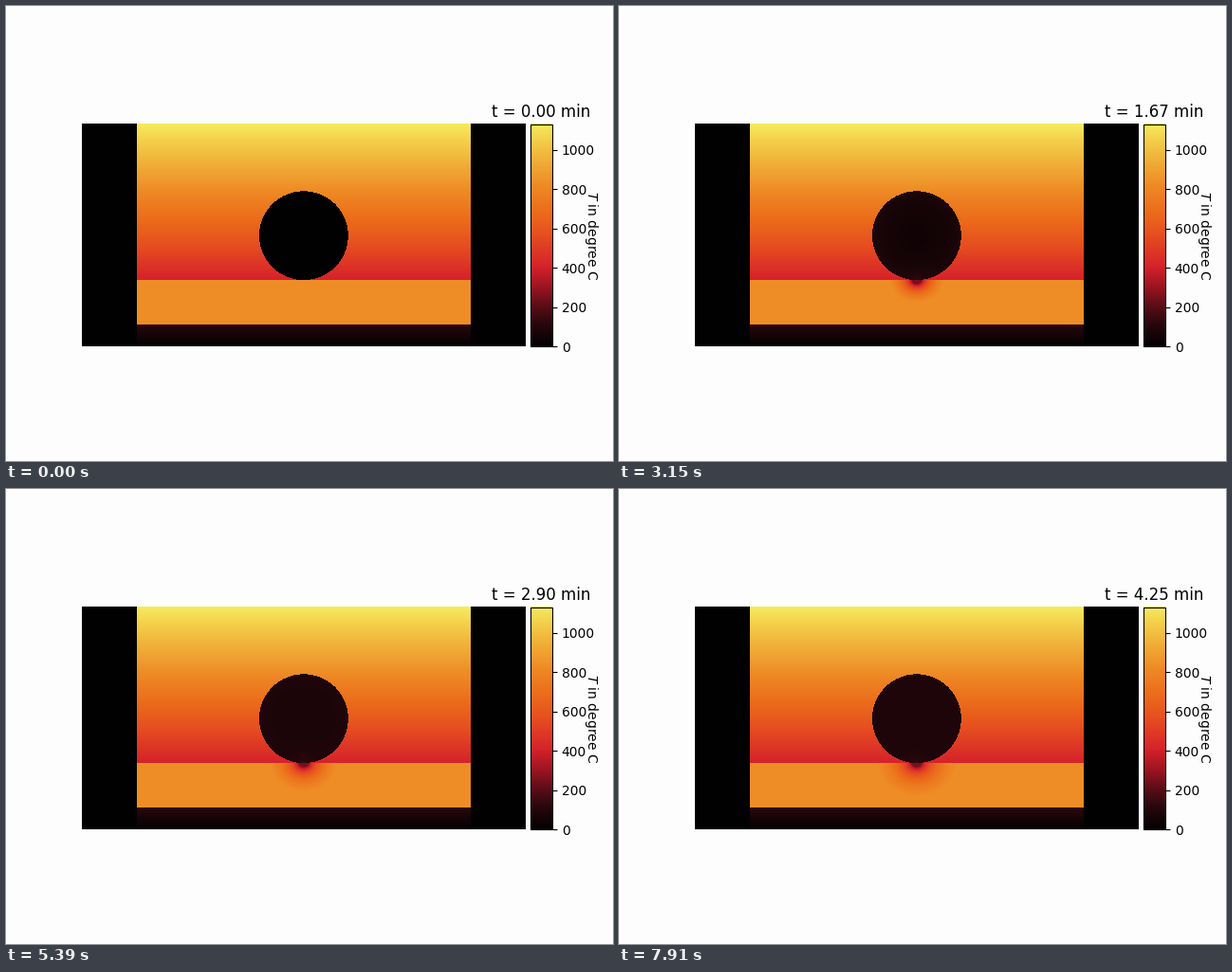
Animation, 640 px wide and 480 px high, one loop 8000 ms. Source, as a matplotlib script:

```python
import numpy as np
import matplotlib.pyplot as plt
from matplotlib.animation import FuncAnimation
from matplotlib.colors import LinearSegmentedColormap
from matplotlib.lines import Line2D
from matplotlib.markers import TICKRIGHT
from matplotlib.patches import Rectangle

W, H = 640, 480
DPI = 100
LOOP, TICK = 8000, 10
T_MAX = 1127.0
T_BED = 827.0

# Heat map pixels, y measured downwards
LEFT, TOP, COLS, ROWS = 80, 124, 468, 235
AIR_BOTTOM, BED_BOTTOM = 289, 336
WALL_L, WALL_R = 138, 490
CX, CY, RADIUS = 313.9, 242.2, 46.9

# Colour bar box: 5 % of the map's width, 5 px beside it, y upwards
MAP_W = (496 - 5) / 1.05
MID_Y = 237.6
BAR_X0, BAR_X1 = LEFT + MAP_W + 5, 576.0
BAR_Y0, BAR_Y1 = MID_Y - MAP_W / 4, MID_Y + MAP_W / 4

STOPS = [
    (0.00, (2, 1, 1)), (0.10, (40, 7, 12)), (0.18, (90, 13, 22)),
    (0.27, (158, 20, 34)), (0.36, (214, 34, 42)), (0.50, (230, 78, 32)),
    (0.60, (235, 106, 26)), (0.72, (238, 137, 36)), (0.85, (240, 179, 58)),
    (0.93, (243, 207, 74)), (1.00, (245, 234, 94)),
]
cmap = LinearSegmentedColormap.from_list(
    "heat", [(p, np.array(c) / 255) for p, c in STOPS], N=256)
LUT = (cmap(np.arange(256)) * 255).round().astype(np.uint8)


def colour(temp):
    idx = np.clip(temp / T_MAX * 256, 0, 255).astype(np.uint8)
    return LUT[idx]


X, Y = np.meshgrid(LEFT + np.arange(COLS) + 0.5, TOP + np.arange(ROWS) + 0.5)
inside = (X > WALL_L) & (X < WALL_R)
bed = inside & (Y > AIR_BOTTOM) & (Y < BED_BOTTOM)
rho2 = ((X - CX) ** 2 + (Y - CY) ** 2) / RADIUS ** 2
ball = (rho2 < 1) & (Y < AIR_BOTTOM)
contact = np.hypot(0.85 * (X - CX), Y - AIR_BOTTOM)


def base_field():
    temp = np.zeros((ROWS, COLS))
    depth = (Y - TOP) / (AIR_BOTTOM - TOP)
    air = inside & (Y < AIR_BOTTOM)
    temp[air] = (T_MAX - 727 * depth)[air]
    floor = inside & (Y > BED_BOTTOM)
    temp[floor] = (120 * (1 - (Y - BED_BOTTOM) / 23))[floor]
    temp[bed] = T_BED
    return temp


BASE = base_field()
BALL_R, BALL_Q = contact[ball], 1 - rho2[ball]
BED_R = contact[bed]


def field(t):
    """Temperature after t minutes: the ball warms, the bed cools below it."""
    temp = BASE.copy()
    start = 1 - np.exp(-t / 0.2)

    delay = 0.95 + 0.85 * BALL_Q
    warm = 80 * (1 - np.exp(-(t / delay) ** 2))
    temp[ball] = warm + 60 * start * np.exp(-BALL_R / 7)

    core = 4.0
    reach = core + 16 * np.sqrt(t) + 0.01
    loss = np.log(reach / np.maximum(BED_R, core)) / np.log(reach / core)
    temp[bed] = T_BED - 580 * start * np.clip(loss, 0, 1) ** 1.15
    return temp


# Nine unevenly timed steps in every 420 ms
OFFSETS = np.array([0, 20, 60, 110, 150, 190, 230, 280, 320])


def step_at(ms):
    cycle, rest = divmod(ms - 30, 420)
    return max(0, 9 * cycle + int((OFFSETS <= rest).sum()) - 1)


plt.rcParams["font.family"] = "DejaVu Sans"
fig = plt.figure(figsize=(W / DPI, H / DPI), dpi=DPI, facecolor="#fdfdfd")


def px(points):
    return points * DPI / 72


def label(x, y, text, **kw):
    return fig.text(x / W, y / H, text, color="black", **kw)


heat = fig.figimage(colour(BASE), xo=LEFT, yo=H - TOP - ROWS, origin="upper")

ramp = (1 - (np.arange(ROWS) + 0.5) / ROWS) * T_MAX
fig.figimage(np.repeat(colour(ramp)[:, None], 23, axis=1),
             xo=553, yo=H - TOP - ROWS, origin="upper")
fig.add_artist(Rectangle(
    (BAR_X0 / W, BAR_Y0 / H), (BAR_X1 - BAR_X0) / W, (BAR_Y1 - BAR_Y0) / H,
    transform=fig.transFigure, fill=False, ec="black", lw=0.8))

values = np.arange(0, 1001, 200)
tick_y = BAR_Y0 + values / T_MAX * (BAR_Y1 - BAR_Y0)
fig.add_artist(Line2D(
    np.full(len(values), BAR_X1 / W), tick_y / H, transform=fig.transFigure,
    ls="none", marker=TICKRIGHT, ms=3.5, mew=0.8, color="black"))
numbers = [label(BAR_X1 + px(7), y, str(v), size=10, ha="left",
                 va="center_baseline") for v, y in zip(values, tick_y)]

right = max(n.get_window_extent().x1 for n in numbers)
label(right + px(4), MID_Y, "$T$ in degree C", size=10, rotation=270,
      rotation_mode="anchor", ha="center", va="top")
title = label((BAR_X0 + BAR_X1) / 2, BAR_Y1 + px(6), "", size=12,
              ha="center", va="baseline")

shown = None


def show_step(n):
    global shown
    if n != shown:
        shown = n
        heat.set_data(colour(field(n * 0.025)))
        title.set_text(f"t = {n * 5 // 2 / 100:.2f} min")
    return heat, title


def init():
    return show_step(0)


def update(frame):
    return show_step(step_at(frame * TICK))


anim = FuncAnimation(fig, update, frames=LOOP // TICK, init_func=init,
                     interval=TICK, repeat=True, repeat_delay=0, blit=False)
plt.show()
```
